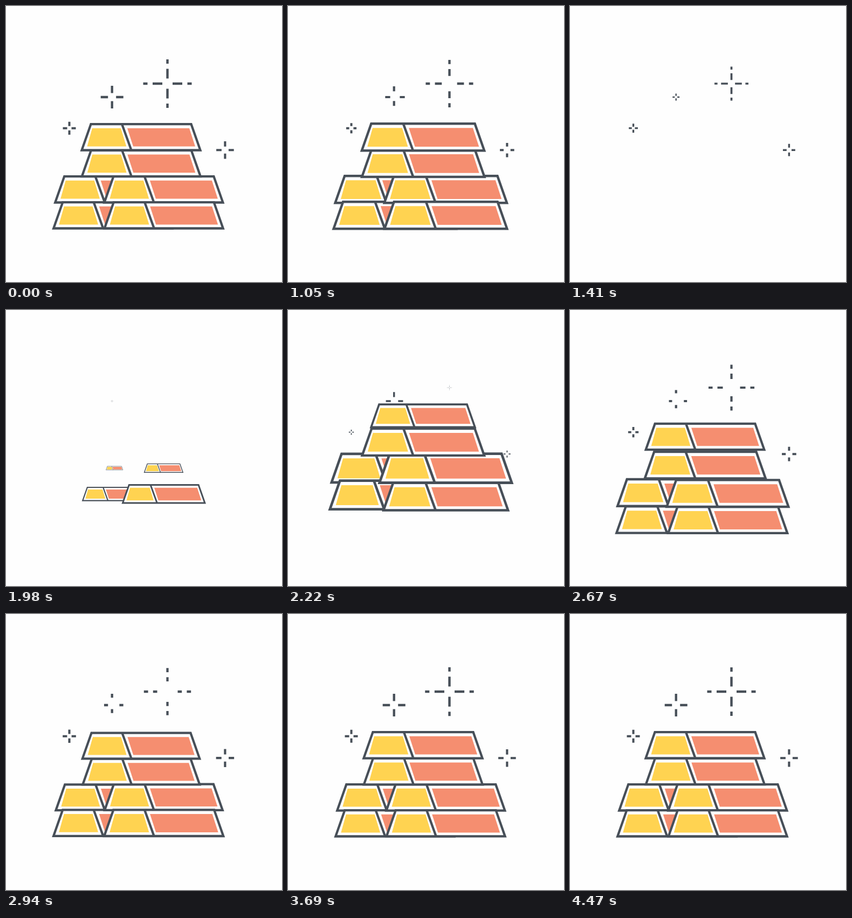
Animation, 512 px wide and 512 px high, one loop 4500 ms. Source, as an HTML page with a canvas:

```html
<!DOCTYPE html>
<html lang="en">
<head>
<meta charset="utf-8">
<title>Gold bars</title>
<style>
html, body { margin: 0; width: 100%; height: 100%; overflow: hidden; background: #fefefe; }
canvas { display: block; width: 100vw; height: 100vh; }
</style>
</head>
<body>
<canvas id="stage" width="512" height="512"></canvas>
<script>
const LOOP = 4500;
const INK = '#474f58', GOLD = '#ffd351', CORAL = '#f58e70', PAPER = '#fefefe';
const ENTER = 1830, STAGGER = 40, DROP = 47;
const ctx = document.getElementById('stage').getContext('2d');

const clamp = p => Math.min(1, Math.max(0, p));
const smooth = p => (1 - Math.cos(Math.PI * clamp(p))) / 2;
const bump = p => Math.sin(Math.PI * clamp(p)) ** 2;

// Damped spring swing that starts at rest position.
function ring(ms) {
  const s = Math.max(0, ms) / 1000;
  return Math.sin(2 * Math.PI * 2.35 * s) * Math.exp(-3.3 * s);
}

// Steady growth to full size, then a springy overshoot.
const pop = (age, time) => clamp(age / time) + 0.16 * ring(age - time);

// Listed from back to front; turn is the order of landing.
const bars = [
  { x: 201.2, y: 340.3, turn: 3 },
  { x: 198.2, y: 388.3, turn: 1 },
  { x: 292.4, y: 340.3, turn: 2 },
  { x: 292.7, y: 388.3, turn: 0 },
  { x: 250.8, y: 292, turn: 4 },
  { x: 250.5, y: 243.3, turn: 5 }
];

function barPose(t, turn) {
  if (t < ENTER) {
    const swell = 1 + 0.06 * smooth((t - 955) / 180);
    return { size: swell * (1 - clamp((t - 1140) / 235)), lift: 0 };
  }
  const age = t - ENTER - turn * STAGGER;
  return {
    size: pop(age, 218),
    lift: DROP * (smooth((age - 290) / 485) - 1) + 2 * ring(age - 775)
  };
}

// Quadrilateral from its top and bottom edges.
function quad(y0, l0, r0, y1, l1, r1) {
  ctx.beginPath();
  ctx.moveTo(l0, y0);
  ctx.lineTo(r0, y0);
  ctx.lineTo(r1, y1);
  ctx.lineTo(l1, y1);
  ctx.closePath();
}

function drawBar({ x, y, turn }, t) {
  const { size, lift } = barPose(t, turn);
  if (size < 0.005) return;
  ctx.save();
  ctx.translate(x, y + lift);
  ctx.scale(size, size);
  quad(-24.2, -93, 93, 24.2, -110, 110);
  ctx.fillStyle = PAPER;
  ctx.fill();
  ctx.lineWidth = 4.3;
  ctx.strokeStyle = INK;
  ctx.stroke();
  ctx.beginPath();
  ctx.moveTo(-35.5, -24.2);
  ctx.lineTo(-18, 24.2);
  ctx.stroke();
  quad(-16.5, -90.5, -37.5, 17.2, -100, -27.2);
  ctx.fillStyle = GOLD;
  ctx.fill();
  quad(-16.5, -25.5, 89.5, 17.2, -14.5, 100.5);
  ctx.fillStyle = CORAL;
  ctx.fill();
  ctx.restore();
}

const ARMS = [[1, 0], [-1, 0], [0, -1], [0, 1]];

// Dashes flow outward, inward, or across from left to right and bottom to top.
const trimsTip = {
  out: () => false,
  in: () => true,
  across: (dx, dy) => dx - dy < 0
};

const sparkles = [
  { x: 299.5, y: 144, width: 4.4, dash: [9.5, 27.5], tip: [37, 45],
    flow: 'out', gone: 1660, enter: 2167, grow: 533, calm: 3700 },
  { x: 196.7, y: 169, width: 4.3, dash: [7.5, 21],
    flow: 'across', gone: 1480, enter: 1950, grow: 340, calm: 3500 },
  { x: 117.5, y: 226.7, width: 4, dash: [4, 12],
    flow: 'in', gone: 1660, enter: 2080, grow: 320, calm: 2840 },
  { x: 406.4, y: 267.2, width: 4.1, dash: [6.5, 16.3],
    flow: 'in', gone: 1660, enter: 2080, grow: 320, calm: 2840 }
];

function drawSparkle(s, t) {
  const leaving = t < s.enter;
  const size = leaving
    ? 1 - clamp((t - 600) / (s.gone - 600)) ** 4.5
    : pop(t - s.enter, s.grow);
  if (size < 0.01) return;
  const trim = leaving
    ? 0.28 * bump((t - 700) / 700)
    : 0.56 * bump((t - s.enter) / (s.calm - s.enter));
  const cut = trim * (s.dash[1] - s.dash[0]);

  ctx.save();
  ctx.translate(s.x, s.y);
  ctx.scale(size, size);
  // Strokes thin out more slowly than they shorten when leaving.
  ctx.lineWidth = leaving ? s.width / Math.sqrt(size) : s.width;
  ctx.strokeStyle = INK;
  ctx.beginPath();
  for (const [dx, dy] of ARMS) {
    const line = (a, b) => {
      ctx.moveTo(dx * a, dy * a);
      ctx.lineTo(dx * b, dy * b);
    };
    const [a, b] = s.dash;
    if (trimsTip[s.flow](dx, dy)) line(a, b - cut);
    else line(a + cut, b);
    if (s.tip) line(...s.tip);
  }
  ctx.stroke();
  ctx.restore();
}

function draw(t) {
  ctx.fillStyle = PAPER;
  ctx.fillRect(0, 0, 512, 512);
  for (const s of sparkles) drawSparkle(s, t);
  for (const b of bars) drawBar(b, t);
}

const start = performance.now();
function tick() {
  draw((performance.now() - start) % LOOP);
  requestAnimationFrame(tick);
}
tick();
</script>
</body>
</html>
```
